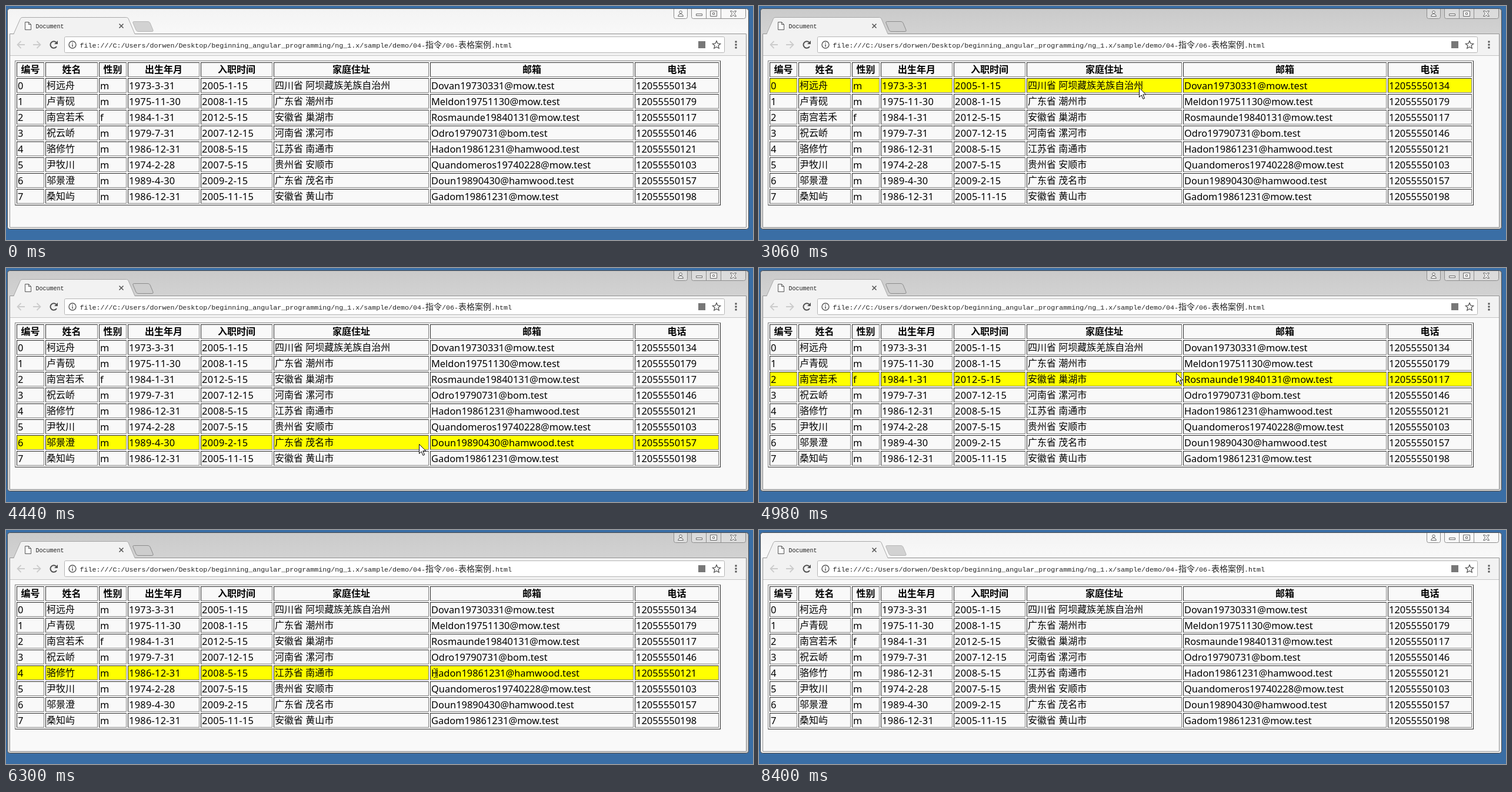
An HTML page for the animation above (8580 ms loop, 1270 px wide and 399 px high).

```html
<!DOCTYPE html>
<html lang="zh">
<head>
<meta charset="utf-8">
<title>Document</title>
<style>
html, body { margin: 0; width: 100%; height: 100%; overflow: hidden; background: #3a6ea5; }
svg { position: absolute; left: 0; top: 0; }
text { font-family: "Liberation Mono", "Noto Sans CJK SC", monospace; fill: #222; white-space: pre; }
.cjk { font: 14px "Noto Sans CJK SC", "Noto Sans CJK", sans-serif; }
table {
  position: absolute; left: 15px; top: 93px; width: 1200px;
  table-layout: fixed; border-spacing: 2px; color: #000;
  font: 16.4px/21px "Noto Sans", "Noto Sans CJK SC", "Noto Sans CJK", sans-serif;
}
th, td { height: 21px; padding: 1px; white-space: nowrap; box-sizing: content-box; }
th, td:nth-child(2), td:nth-child(6) { font-size: 16px; }
td:nth-child(4), td:nth-child(5) { letter-spacing: .25px; }
tr.on { background: #ff0; }
#frame { fill: url(#idle); }
#plus { fill: #d2d2d2; stroke: #b8b8b8; }
.active #frame { fill: url(#focus); }
.active #plus { fill: #cdcdcd; stroke: #8c8c8c; }
</style>
</head>
<body>
<svg id="win" width="1270" height="399" fill="none">
  <defs>
    <linearGradient id="idle" x2="0" y2="1">
      <stop stop-color="#f3f3f3"/><stop offset=".1" stop-color="#f8f8f8"/><stop offset="1" stop-color="#f4f4f4"/>
    </linearGradient>
    <linearGradient id="focus" x2="0" y2="1">
      <stop stop-color="#cacaca"/><stop offset=".11" stop-color="#d2d2d2"/><stop offset="1" stop-color="#d0d0d0"/>
    </linearGradient>
  </defs>
  <rect id="frame" x="2.5" y="4.5" width="1260" height="376" rx="4" stroke="#48484a"/>
  <path d="M6.5 47.5H1258.5V377.5H6.5z" fill="#f9f9f9" stroke="#929292"/>
  <path d="M7 48H1258V84H7z" fill="#f2f2f2"/>
  <path d="M7 84.5H1258" stroke="#c4c4c4"/>
  <path d="M13 47.5L24.500 21.500Q25.500 19.500 28 19.500H204.500Q207 19.500 208 21.500L219 47.500" fill="#f2f2f2" stroke="#a8a8a8"/>
  <path d="M14 47.500H218.500" stroke="#f2f2f2"/>
  <path id="plus" d="M217.500 26.500H241Q244 26.500 245 29L250 41Q251 43.500 248 43.500H225Q222 43.500 221 41L216 29Q215 26.500 217.500 26.500z"/>
  <path id="doc" d="M32.500 27.500H38.500L42.500 31.500V40.500H32.500zM38.500 27.500V31.500H42.500" fill="#fff" stroke="#555"/>
  <text x="50.500" y="38" font-size="10">Document</text>
  <path d="M192.500 30.500l7 7m0-7l-7 7" stroke="#555" stroke-width="1.600"/>

  <!-- window buttons -->
  <path d="M1135.500 5V18.500Q1135.500 21.500 1138.500 21.500H1155.500Q1158.500 21.500 1158.500 18.500V5M1165.500 5V18.500Q1165.500 21.500 1168.500 21.500H1254.500Q1257.500 21.500 1257.500 18.500V5M1190.500 5V21M1215.500 5V21" fill="#fff" fill-opacity=".3" stroke="#8c8c8c"/>
  <g stroke="#666" fill="#fff">
    <circle cx="1147" cy="10.500" r="2.300"/>
    <path d="M1142.500 17.500Q1143 13.500 1147 13.500T1151.500 17.500z"/>
    <path d="M1173.500 13.500H1183.500V16.500H1173.500zM1197.500 8.500H1208.500V17.500H1197.500zM1201.500 11.500H1204.500V14.500H1201.500z"/>
    <path d="M1231.500 8.500H1234.500L1236.500 11L1238.500 8.500H1241.500L1238.500 13L1241.500 17.500H1238.500L1236.500 15L1234.500 17.500H1231.500L1234.500 13z"/>
  </g>

  <!-- toolbar -->
  <path d="M32 66H19.500M25.500 60L19.500 66L25.500 72M46 66H58.500M52.500 60L58.500 66L52.500 72" stroke="#ccc" stroke-width="1.800"/>
  <circle id="press" cx="81" cy="66" r="10" fill="#c9c9c9"/>
  <path d="M86 69A5.700 5.700 0 1 1 85.200 62" stroke="#505050" stroke-width="2"/>
  <path d="M88 59V65H82z" fill="#505050"/>
  <rect x="99.500" y="52.500" width="1122" height="27" rx="2" fill="#fff" stroke="#b4b4b4"/>
  <circle cx="113" cy="66" r="6" stroke="#555" stroke-width="1.400"/>
  <path d="M113 62.500V64M113 65.200V69.500" stroke="#555" stroke-width="1.500"/>
  <text x="125.500" y="71" font-size="11.667">file:///C:/Users/dorwen/Desktop/beginning_angular_programming/ng_1.x/sample/demo/04-<tspan class="cjk">指令</tspan>/06-<tspan class="cjk">表格案例</tspan>.html</text>
  <rect x="1177" y="60" width="12" height="12" fill="#777"/>
  <path d="M1208 59.500L1210 64L1214.600 64.400L1211.100 67.500L1212.200 72.200L1208 69.700L1203.800 72.200L1204.900 67.500L1201.400 64.400L1206 64z" stroke="#555" stroke-width="1.300"/>
  <path d="M1241 59.500v3m0 2v3m0 2v3" stroke="#555" stroke-width="3"/>
</svg>

<table border="1"></table>

<svg id="cursor" width="30" height="30" overflow="visible">
  <path id="arrow" d="M.5 .5V16.500L4.200 13L7 19.500L9.600 18.400L6.800 12H11.800z" fill="#fff" stroke="#000"/>
  <path id="beam" d="M-3 -7.500H-1L.5 -6.500L2 -7.500H4M.5 -6.500V6.500M-3 7.500H-1L.5 6.500L2 7.500H4" fill="none" stroke="#222"/>
</svg>

<script>
const LOOP = 8580, STEP = 60;
const $ = s => document.querySelector(s);

const widths = [47, 89, 47, 122, 122, 264, 346, 143];
const heads = '编号,姓名,性别,出生年月,入职时间,家庭住址,邮箱,电话'.split(',');
const people = `柯远舟,m,1973-3-31,2005-1-15,四川省 阿坝藏族羌族自治州,Dovan19730331@mow.test,12055550134
卢青砚,m,1975-11-30,2008-1-15,广东省 潮州市,Meldon19751130@mow.test,12055550179
南宫若禾,f,1984-1-31,2012-5-15,安徽省 巢湖市,Rosmaunde19840131@mow.test,12055550117
祝云峤,m,1979-7-31,2007-12-15,河南省 漯河市,Odro19790731@bom.test,12055550146
骆修竹,m,1986-12-31,2008-5-15,江苏省 南通市,Hadon19861231@hamwood.test,12055550121
尹牧川,m,1974-2-28,2007-5-15,贵州省 安顺市,Quandomeros19740228@mow.test,12055550103
邬景澄,m,1989-4-30,2009-2-15,广东省 茂名市,Doun19890430@hamwood.test,12055550157
桑知屿,m,1986-12-31,2005-11-15,安徽省 黄山市,Gadom19861231@mow.test,12055550198`.split('\n');

const cells = (tag, list) => `<tr>${list.map(v => `<${tag}>${v}</${tag}>`).join('')}</tr>`;
$('table').innerHTML =
  `<colgroup>${widths.map(w => `<col style="width:${w}px">`).join('')}</colgroup>` +
  cells('th', heads) +
  people.map((p, i) => cells('td', [i, ...p.split(',')])).join('');
const rows = [...document.querySelectorAll('tr')].slice(1);

// pointer path: time, x, y
const path = [
  [240, 1266, 150], [480, 1100, 100], [1080, 212, 76], [1800, 80, 62], [2040, 80, 62],
  [2580, 624, 102], [2700, 624, 102], [3600, 680, 195], [3660, 686, 216], [4080, 695, 319],
  [4320, 701, 319], [4440, 702, 300], [4500, 703, 260], [5220, 712, 138], [5340, 712, 138],
  [5820, 714, 167], [6180, 718, 256], [6240, 718, 256], [6900, 852, 126], [7020, 880, 109],
  [7140, 920, 145], [7560, 1268, 150]
];

function pointer(t) {
  const i = path.findIndex(p => p[0] > t);
  if (i < 1) return null;
  const [t0, x0, y0] = path[i - 1], [t1, x1, y1] = path[i];
  const k = (t - t0) / (t1 - t0);
  return { x: Math.round(x0 + (x1 - x0) * k), y: Math.round(y0 + (y1 - y0) * k) };
}

const show = (sel, on) => { $(sel).style.visibility = on ? 'visible' : 'hidden'; };

function draw() {
  const t = Math.floor(performance.now() % LOOP / STEP) * STEP;
  const p = pointer(t);
  const overTable = p && p.x > 16 && p.x < 1213;
  const row = overTable ? Math.floor((p.y - 122) / 27) : -1;
  const overText = p && p.x > 723 && p.x < 930 && p.y > 96;

  $('#win').classList.toggle('active', t >= 600 && t < 8400);
  rows.forEach((r, i) => r.classList.toggle('on', i === row));
  show('#doc', t < 1980 || t >= 2100);
  show('#press', p && Math.hypot(p.x - 81, p.y - 66) < 13);
  show('#arrow', p && !overText);
  show('#beam', overText);
  if (p) $('#cursor').style.transform = `translate(${p.x}px, ${p.y}px)`;
  requestAnimationFrame(draw);
}
draw();
</script>
</body>
</html>
```
